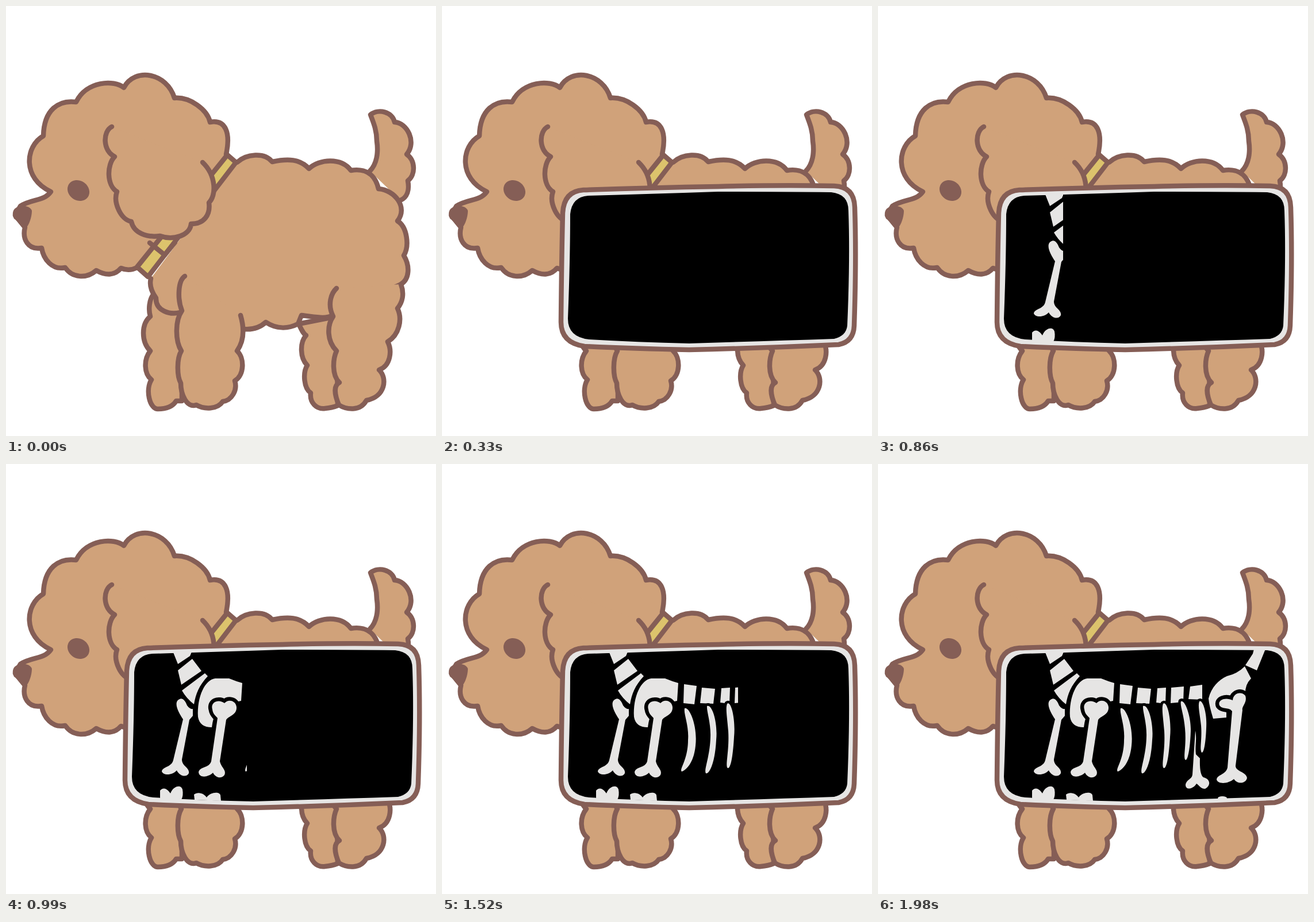
Recreate the animation shown at these times as an HTML page. Size 748 by 748 pixels, loop 2310 ms.

```html
<!DOCTYPE html>
<html lang="en">
<head>
<meta charset="utf-8">
<title>Poodle X-ray</title>
<style>
  html, body { margin: 0; width: 100%; height: 100%; overflow: hidden; background: #fff; }
  svg { position: absolute; left: 0; top: 0; width: 748px; height: 748px; }

  .fur { fill: #d0a27a; }
  .line { stroke: #855e56; stroke-width: 8.5; stroke-linecap: round; stroke-linejoin: round; }
  .dark { fill: #855e56; }
  .collar { fill: #dcc36c; }
  .bone { fill: #e6e5e4; }
  .halo { stroke: #000; stroke-width: 13; stroke-linejoin: round; paint-order: stroke; }
  .rib { stroke-width: 9; }

  #panel { animation: show 2310ms step-end infinite; }
  #bones { animation: scan 2310ms step-end infinite; }

  @keyframes show {
    0% { visibility: hidden; }
    14.2857%, 100% { visibility: visible; }
  }
  /* the visible strip widens from left to right */
  @keyframes scan {
    0% { clip-path: inset(0 748px 0 0); }
    28.5714% { clip-path: inset(0 426px 0 0); }
    42.8571% { clip-path: inset(0 329px 0 0); }
    57.1429% { clip-path: inset(0 233px 0 0); }
    71.4286% { clip-path: inset(0 135px 0 0); }
    85.7143%, 100% { clip-path: inset(0 0 0 0); }
  }
</style>
</head>
<body>
<svg id="dog" viewBox="0 0 748 748">
  <g class="fur line">
    <!-- tail -->
    <path d="M633 287C645 275 648 255 645 235C645 215 638 200 634 189C648 178 672 184 676 202C698 203 715 237 697 258C712 268 713 294 699 304C702 320 698 333 686 338"/>
    <!-- far legs -->
    <path d="M258 500C248 510 248 530 251 540C235 553 235 584 251 600C239 615 240 640 253 650C242 668 250 701 264 701C280 701 290 697 296 687L306 687L306 520Z"/>
    <path d="M509 553C515 565 517 570 522 573C511 585 511 612 524 625C516 638 518 665 530 673C528 690 540 702 555 700Q567 699 577 695L575 540Z"/>
    <!-- body -->
    <path d="M402 272C418 257 450 254 463 271C490 265 512 266 527 283C545 266 583 263 600 286C624 282 642 292 648 318C676 320 700 350 681 374C698 384 702 418 692 434C703 452 702 475 687 484L569 538C555 545 540 541 514 538L508 553C490 562 470 562 452 550C440 561 425 563 414 562L303 533C285 538 260 530 261 508Q248 490 252 474"/>
    <!-- near legs -->
    <path d="M408 538C413 555 416 580 402 600C415 612 415 642 398 652C403 668 393 686 377 688C368 702 345 702 331 694C314 700 304 675 304 656C297 643 297 613 305 600C294 582 294 547 306 530C298 510 299 478 311 470"/>
    <path d="M687 484C693 500 690 515 681 526C690 545 684 572 664 584C672 600 669 626 649 633C664 647 660 680 627 686C616 706 592 702 579 694C571 675 570 660 580 655C566 642 569 613 575 600C558 583 558 556 569 540C559 520 565 500 575 491"/>
    <!-- head -->
    <path d="M383 258C391 220 382 197 355 202C350 180 320 158 293 160C280 116 224 106 205 142C188 128 140 130 122 167C92 163 66 180 65 226C33 244 28 300 78 323C66 340 45 335 25 348L16 364L33 385C28 405 38 425 62 421C65 440 80 460 103 455C115 473 140 475 157 460C175 470 190 468 200 456Q214 462 228 455"/>
  </g>
  <g class="collar line">
    <path d="M385 259L400 272L247 471L228 454Z"/>
    <path fill="none" d="M250 412L276 433L294 411"/>
  </g>
  <!-- ear -->
  <path class="fur line" d="M184 210C168 218 168 252 189 262C175 276 175 312 193 323C186 342 200 372 218 375C222 395 245 403 268 400C290 408 320 400 322 379C344 379 356 364 353 342C366 330 366 295 342 272"/>
  <ellipse class="dark" cx="126" cy="321" rx="20" ry="17" transform="rotate(35 126 321)"/>
  <path class="dark" d="M16 352C25 345 42 347 45 356C45 370 38 385 33 388C25 385 22 375 14 370C10 362 12 355 16 352Z"/>
</svg>

<svg id="panel" viewBox="0 0 748 748">
  <path class="bone line" d="M246 320Q360 316 480 314Q590 311 682 313Q717 314 718 350Q721 440 717 556Q716 584 690 589Q560 595 430 598Q330 596 248 592Q207 586 207 550Q208 440 210 360Q212 322 246 320Z"/>
  <path d="M254 330Q360 327 480 323Q590 323 677 324Q707 327 707 356Q710 440 705 556Q703 574 682 579Q560 583 430 587Q340 585 256 580Q219 576 219 544Q223 440 223 362Q226 332 254 330Z"/>
</svg>

<svg id="bones" viewBox="0 0 748 748">
  <g class="bone">
    <!-- neck -->
    <path d="M291 328L323 327L320 334L299 348Z"/>
    <path d="M299 359L324 339L340 360L305 384Z"/>
    <path d="M306 394L346 364L351 369C336 385 330 400 327 418Q314 408 306 394Z"/>
    <!-- far front leg and paws -->
    <path d="M298 412C306 403 312 412 315 420Q320 427 325 426L325 438L319 445L306 514C306 526 320 528 318 538C314 546 302 543 297 533C290 541 275 543 271 535C272 526 288 528 291 515L308 444C302 435 293 420 298 412Z"/>
    <path d="M268 568C275 560 282 567 286 573C290 561 304 556 307 566Q309 577 305 584L268 584Z"/>
    <path d="M327 575C335 569 345 574 349 580C355 571 371 569 373 576L374 586L328 584Z"/>
    <ellipse cx="599" cy="581" rx="8" ry="3"/>
    <!-- shoulder -->
    <path d="M334 440C332 405 346 375 364 373L388 373Q400 378 411 381L409 412L370 420Q360 440 358 458Q337 458 334 440Z"/>
    <path class="halo" d="M359 427C355 414 370 408 380 416C388 407 402 413 401 425C400 437 388 438 383 445L372 517C374 528 384 532 380 541C374 549 364 545 360 537C352 545 336 547 335 536C337 526 354 529 357 517L368 442C364 437 360 435 359 427Z"/>
    <!-- spine -->
    <path d="M421 383L443 386L439 418L420 416Z"/>
    <path d="M452 389L475 391L472 417L449 416Z"/>
    <path d="M486 390L501 389L500 417L484 415Z"/>
    <path d="M510 389L532 387L531 414L509 416Z"/>
    <path d="M543 387L564 384L564 410L540 409Z"/>
    <!-- far hind leg -->
    <path d="M552 464C555 480 551 490 553 505L560 512Q559 540 566 545C579 548 579 560 569 565C561 565 558 558 554 556C548 566 535 568 535 558C537 548 546 549 547 540L549 510Z"/>
    <!-- pelvis and tail -->
    <path d="M575 408C580 388 592 376 607 369Q625 365 638 352L649 373Q638 384 639 400L606 425L606 441L583 443Q576 420 575 408Z"/>
    <path d="M639 350L652 330L654 322L674 322L659 359Z"/>
    <!-- ribs -->
    <g class="halo rib">
      <path d="M422 425C430 421 445 455 441 490C438 520 425 532 417 535C412 531 428 515 428 480C430 455 420 435 422 425Z"/>
      <path d="M461 421C470 417 480 450 477 480C475 520 465 540 459 538C455 532 466 510 467 475C468 450 460 430 461 421Z"/>
      <path d="M496 417C503 411 511 445 508 475C506 510 502 530 497 529C492 525 500 500 498 465C496 440 493 425 496 417Z"/>
      <path d="M527 413C534 409 545 440 544 465C543 495 539 515 535 515C530 512 537 490 534 460C532 435 525 420 527 413Z"/>
      <path d="M559 413C565 409 573 435 571 460C570 485 567 503 563 502C559 495 564 480 562 455C560 435 556 420 559 413Z"/>
    </g>
    <!-- near hind leg -->
    <path class="halo" d="M594 420C590 410 605 405 617 411C618 398 632 395 639 403C643 415 632 422 634 428L622 525C622 535 640 535 642 546C640 556 626 558 619 548C610 556 592 558 589 549C590 540 605 541 608 528L616 430C610 422 600 428 594 420Z"/>
  </g>
</svg>
</body>
</html>
```
